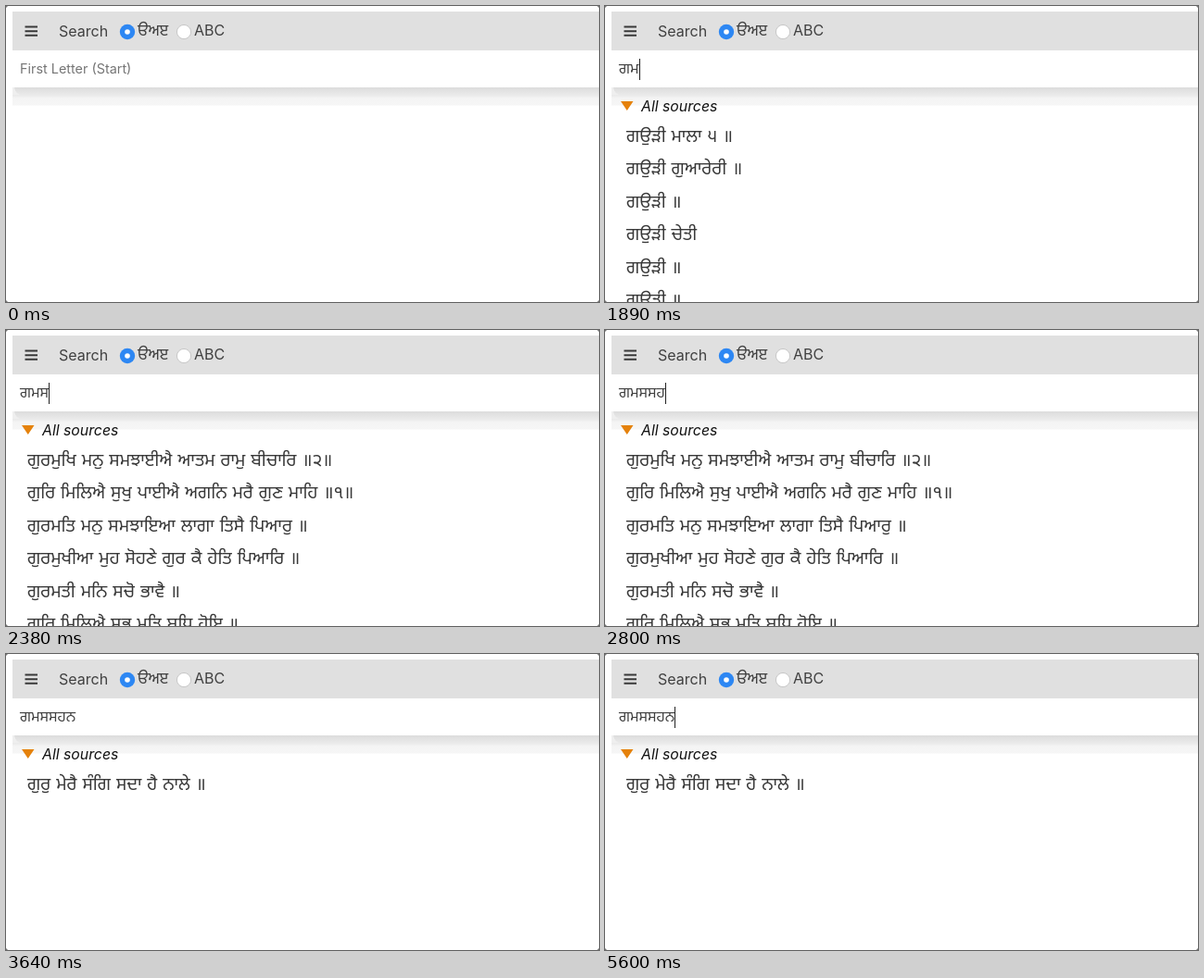
These frames come from a looping animation (640x320 px, 5670 ms). An HTML page:

```html
<!DOCTYPE html>
<html lang="pa">
<head>
<meta charset="utf-8">
<title>Search as you type</title>
<style>
html, body { margin: 0; width: 100%; height: 100%; overflow: hidden; background: #fff; }
svg { display: block; }
text { font-family: Inter, Roboto, sans-serif; fill: #404040; white-space: pre; }
.gur { font-family: "Noto Sans Gurmukhi", "Noto Sans", sans-serif; }
.thin { font-weight: 300; }
#rows text { font-size: 19px; word-spacing: 1px; fill: #383838; }
</style>
</head>
<body>
<svg width="640" height="320" viewBox="0 0 640 320">
  <defs>
    <linearGradient id="shade" x1="0" y1="0" x2="0" y2="1">
      <stop offset="0" stop-color="#dcdcdc"/>
      <stop offset=".45" stop-color="#ebebeb"/>
      <stop offset=".6" stop-color="#f4f4f4"/>
      <stop offset="1" stop-color="#f6f6f6"/>
    </linearGradient>
  </defs>
  <rect width="640" height="320" fill="#fff"/>
  <path d="M0 0h2L0 2zM640 0h-2l2 2zM0 320h2l-2-2zM640 320h-2l2-2z" fill="#777"/>
  <rect x="7" y="88" width="633" height="19.5" fill="url(#shade)"/>
  <path d="M7 88h2q1 6 6 8H7z" fill="#efefef"/>
  <rect x="7" y="6" width="633" height="42" fill="#e0e0e0"/>
  <path d="M20.5 22.6H34M20.5 27.2H34M20.5 31.8H34" stroke="#383838" stroke-width="2"/>
  <text x="57" y="33" font-size="16">Search</text>
  <circle cx="131" cy="28" r="8.2" fill="#2d87f3"/>
  <circle cx="131" cy="28" r="2.8" fill="#fff"/>
  <text class="gur thin" x="142" y="31.5" font-size="17">ੳਅੲ</text>
  <circle cx="192" cy="28" r="7.6" fill="#fff" stroke="#bdbdbd" stroke-width=".8"/>
  <text x="203" y="32.3" font-size="16">ABC</text>
  <text id="hint" x="15" y="73" font-size="14.4" style="fill:#757575">First Letter (Start)</text>
  <text id="query" class="gur thin" x="15" y="73" font-size="16"></text>
  <rect id="caret" y="57" width="1" height="23" fill="#222"/>
  <g id="results">
    <path d="M17 103h13.5l-6.75 10z" fill="#e5820c"/>
    <text x="39" y="114" font-size="15.8" font-style="italic" style="fill:#111">All sources</text>
    <g id="rows"></g>
  </g>
</svg>
<script>
const LOOP = 5670;
const el = id => document.getElementById(id);

// [time, value] steps
const typed = [[0, ""], [1540, "ਗ"], [1820, "ਗਮ"], [2240, "ਗਮਸ"], [2660, "ਗਮਸਸ"], [2800, "ਗਮਸਸਹ"], [3080, "ਗਮਸਸਹਨ"]];
const blink = [[0, 0], [560, 1], [1050, 0], [1540, 1], [3640, 0], [4130, 1], [4690, 0], [5180, 1]];
const found = [
  [0, []],
  [1890, ["ਗਉੜੀ ਮਾਲਾ ੫ ॥", "ਗਉੜੀ ਗੁਆਰੇਰੀ ॥", "ਗਉੜੀ ॥", "ਗਉੜੀ ਚੇਤੀ", "ਗਉੜੀ ॥", "ਗਉੜੀ ॥"]],
  [2100, ["ਗੁਰਮਤਿ ਮਨੁ ਰਹਸੀਐ ਮੇਰੀ ਮਾਏ ॥", "ਗੁਰਮੁਖਿ ਮਿਲੈ ਮਿਲਾਏ ਆਪੇ ॥", "ਗੁਰਮੁਖਿ ਮਨੁ ਸਮਝਾਈਐ ਆਤਮ ਰਾਮੁ ਬੀਚਾਰਿ ॥੨॥",
    "ਗੁਰ ਮਿਲਿ ਪਾਈਐ ਨਾਮੁ ਨਿਧਾਨੁ ਸਦਾ ਸੁਖੁ ਮਨਿ ਹੋਇ ॥੧॥", "ਗੁਰਿ ਮਿਲਿਐ ਸੁਖੁ ਪਾਈਐ ॥", "ਗੁਰਮਤਿ ਮਨੁ ਠਹਰਾਈਐ ਮੇਰੀ ਜਿੰਦੁੜੀਏ ॥"]],
  [2380, ["ਗੁਰਮੁਖਿ ਮਨੁ ਸਮਝਾਈਐ ਆਤਮ ਰਾਮੁ ਬੀਚਾਰਿ ॥੨॥", "ਗੁਰਿ ਮਿਲਿਐ ਸੁਖੁ ਪਾਈਐ ਅਗਨਿ ਮਰੈ ਗੁਣ ਮਾਹਿ ॥੧॥",
    "ਗੁਰਮਤਿ ਮਨੁ ਸਮਝਾਇਆ ਲਾਗਾ ਤਿਸੈ ਪਿਆਰੁ ॥", "ਗੁਰਮੁਖੀਆ ਮੁਹ ਸੋਹਣੇ ਗੁਰ ਕੈ ਹੇਤਿ ਪਿਆਰਿ ॥", "ਗੁਰਮਤੀ ਮਨਿ ਸਚੋ ਭਾਵੈ ॥", "ਗੁਰਿ ਮਿਲਿਐ ਸਭ ਮਤਿ ਬੁਧਿ ਹੋਇ ॥"]],
  [2940, ["ਗੁਰੁ ਮੇਰੈ ਸੰਗਿ ਸਦਾ ਹੈ ਨਾਲੇ ॥", "ਗੁਰਮੁਖਿ ਮਿਲੇ ਸਿ ਸਜਣਾ ਹਰਿ ਪ੍ਰਭ ਪਾਇਆ ਰੰਗੁ ॥"]],
  [3290, ["ਗੁਰੁ ਮੇਰੈ ਸੰਗਿ ਸਦਾ ਹੈ ਨਾਲੇ ॥"]]
];

const at = (steps, t) => steps.filter(s => s[0] <= t).pop()[1];

let shown;
function showRows(list) {
  if (list === shown) return;
  shown = list;
  el("results").style.display = list.length ? "" : "none";
  el("rows").innerHTML = list.map((line, i) =>
    `<text class="gur" x="23" y="${147 + i * 35.4}">${line}</text>`).join("");
}

function draw(t) {
  const word = at(typed, t), query = el("query");
  if (query.textContent !== word) query.textContent = word;
  el("hint").style.display = word ? "none" : "";
  el("caret").setAttribute("x", word ? Math.round(15 + query.getComputedTextLength()) : 15);
  el("caret").style.display = at(blink, t) ? "" : "none";
  showRows(at(found, t));
}

const start = performance.now();
function tick() {
  draw((performance.now() - start) % LOOP);
  requestAnimationFrame(tick);
}
draw(0);
requestAnimationFrame(tick);
</script>
</body>
</html>
```
